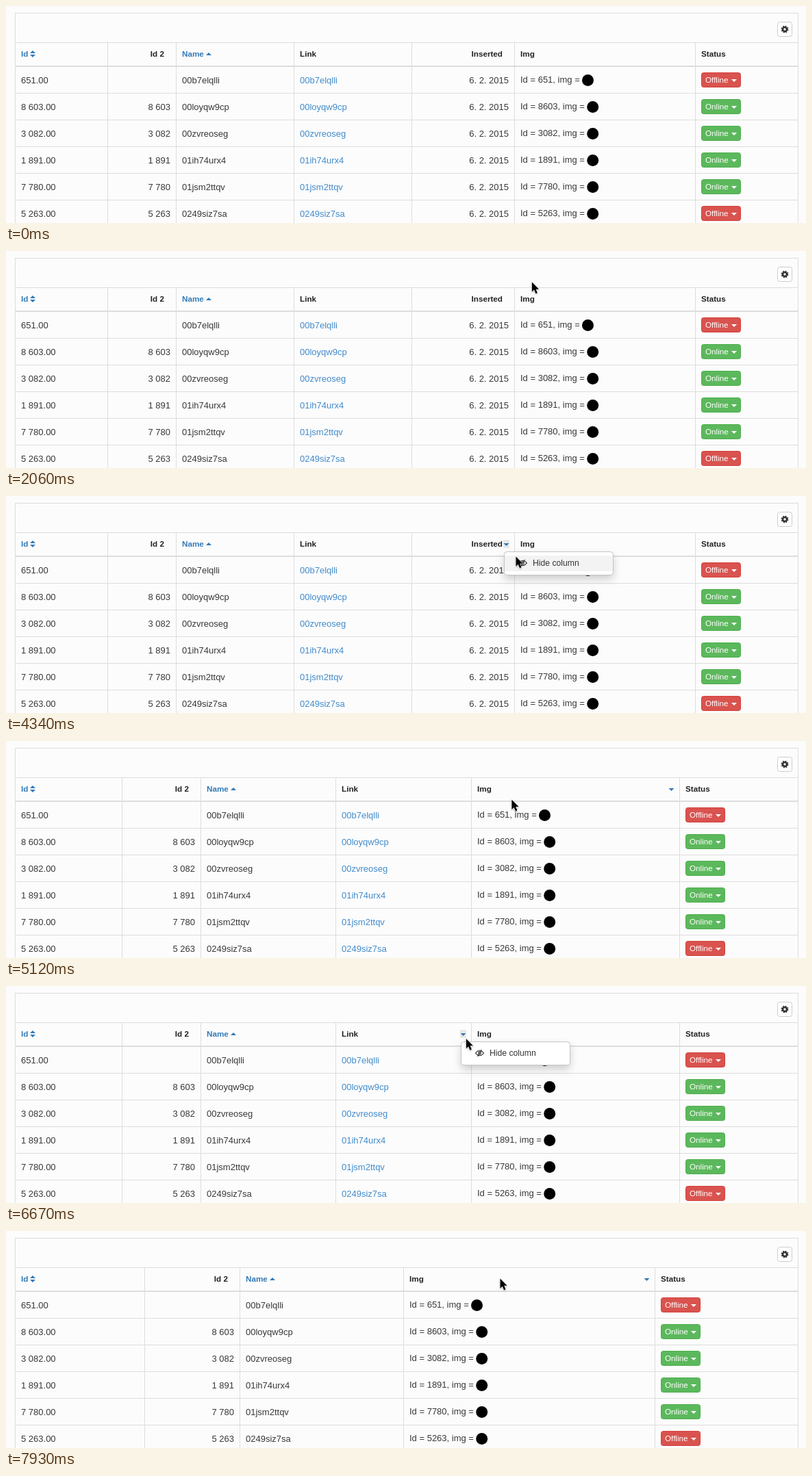
Animation, 1168 px wide and 317 px high, one loop 7990 ms. Source, as an HTML page:

```html
<!DOCTYPE html>
<html lang="en">
<head>
<meta charset="utf-8">
<title>Hiding table columns</title>
<style>
  html, body { margin: 0; width: 100%; height: 100%; overflow: hidden; background: #fcfcfc; }
  svg { display: block; font: 13px "Liberation Sans", Arial, sans-serif; fill: #383838; }
  .head { font-weight: bold; font-size: 11.7px; fill: #222; }
  .blue { fill: #337ab7; }
  .link { fill: #428bca; }
  .button { font-size: 11.7px; fill: #fff; }
  .item { font-size: 12.2px; fill: #333; }
  .end { text-anchor: end; }
  .menu { filter: drop-shadow(0 6px 6px rgba(0, 0, 0, .175)); }
  .arrow { filter: drop-shadow(0 1px 1px rgba(0, 0, 0, .3)); }
</style>
</head>
<body>
<svg id="stage" width="1168" height="317" viewBox="0 0 1168 317"></svg>
<script>
const LOOP = 7990;
const LEFT = 13, RIGHT = 1156;

const rows = [
  [651, '00b7elqlli', false], [8603, '00loyqw9cp', true], [3082, '00zvreoseg', true],
  [1891, '01ih74urx4', true], [7780, '01jsm2ttqv', true], [5263, '0249siz7sa', false],
];

// Columns with their right edges, from the given time on
const layouts = [
  { from: 0, Id: 148, 'Id 2': 248, Name: 420, Link: 592, Inserted: 742, Img: 1006, Status: RIGHT },
  { from: 4400, Id: 169, 'Id 2': 284, Name: 481, Link: 679, Img: 983, Status: RIGHT },
  { from: 7430, Id: 202, 'Id 2': 341, Name: 580, Img: 947, Status: RIGHT },
];

// Pointer moves: start, end, number of steps, quadratic curve
const moves = [
  [1020, 1780, 12, [1190, 60], [1025, 35], [836, 44]],
  [1830, 2460, 12, [836, 44], [733, 38], [732, 69]],
  [3180, 3470, 6, [732, 69], [735, 82], [744.5, 88.5]],
  [5120, 5670, 10, [744.5, 88.5], [715, 74], [667, 70]],
  [6670, 6840, 4, [667, 70], [676, 85], [690.5, 93]],
  [7840, 7930, 2, [690.5, 93], [706, 81], [721.5, 69.5]],
];
const clicks = [[2820, 2880], [3710, 3800], [6380, 6440], [7080, 7140]];
const menus = [[2820, 4400, 'Inserted'], [6380, 7430, 'Link']];

const during = (list, t) => list.find(([start, end]) => t >= start && t < end);
const rect = (x, y, w, h, fill = '#ddd', extra = '') =>
  `<rect x="${x}" y="${y}" width="${w}" height="${h}" fill="${fill}" ${extra}/>`;
const text = (x, y, content, name = '') => `<text x="${x}" y="${y}" class="${name}">${content}</text>`;
const down = (x, y, fill = '#337ab7') => `<path d="M${x - 4} ${y}h8l-4 4z" fill="${fill}"/>`;
const up = (x, y) => `<path d="M${x - 4} ${y}h8l-4-4z" fill="#337ab7"/>`;
const spaced = id => String(id).replace(/(\d)(\d{3})$/, '$1 $2');

function headCell(name, x, right) {
  const sortable = name === 'Id' || name === 'Name';
  const atEnd = name === 'Id 2' || name === 'Inserted';
  const label = text(atEnd ? right - 17 : x, 74, name, `head ${sortable ? 'blue' : ''} ${atEnd ? 'end' : ''}`);
  if (name === 'Id') return label + up(x + 17, 69) + down(x + 17, 71);
  return name === 'Name' ? label + up(x + 39, 72) : label;
}

function statusButton(x, y, online) {
  const [fill, border] = online ? ['#5cb85c', '#4cae4c'] : ['#d9534f', '#d43f3a'];
  return rect(x + .5, y - 10.5, 57, 21, fill, `stroke="${border}" rx="3"`) +
    text(x + 6, y + 4, online ? 'Online' : 'Offline', 'button') + down(x + 48, y - 1, '#fff');
}

function bodyCell(name, x, right, y, [id, word, online]) {
  switch (name) {
    case 'Id': return text(x, y + 5, spaced(id) + '.00');
    case 'Id 2': return id < 1000 ? '' : text(right - 8, y + 5, spaced(id), 'end');
    case 'Name': return text(x, y + 5, word);
    case 'Link': return text(x, y + 5, word, 'link');
    case 'Inserted': return text(right - 8, y + 5, '6. 2. 2015', 'end');
    case 'Img': return text(x, y + 4, `Id = ${id}, img =`) +
      `<circle cx="${x + (id < 1000 ? 98.5 : 105.7)}" cy="${y + .5}" r="8.5" fill="#000"/>`;
    default: return statusButton(x, y, online);
  }
}

function eachColumn({ from, ...columns }, draw) {
  let left = LEFT;
  return Object.entries(columns).map(([name, right]) => {
    const out = draw(name, left, right);
    left = right;
    return out;
  }).join('');
}

function table(layout) {
  const frame = rect(LEFT, 10, RIGHT - LEFT + 1, 1) + rect(LEFT, 10, 1, 307) + rect(RIGHT, 10, 1, 307) +
    rect(LEFT, 53, RIGHT - LEFT, 1) + rect(LEFT, 87, RIGHT - LEFT, 2) +
    rows.map((_, i) => rect(LEFT, 127 + 39 * i, RIGHT - LEFT, 1)).join('');
  const gear = rect(1126.5, 23.5, 21, 21, '#fff', 'stroke="#ccc" rx="3"') +
    `<g fill="none" stroke="#333"><circle cx="1137" cy="34" r="3" stroke-width="2.6"/>
     <circle cx="1137" cy="34" r="4.6" stroke-width="1.6" stroke-dasharray="2 1.61"/></g>`;
  return frame + gear + eachColumn(layout, (name, left, right) =>
    rect(right, 53, 1, 264) + headCell(name, left + 9, right) +
    rows.map((row, i) => bodyCell(name, left + 9, right, 108 + 39 * i, row)).join(''));
}

function menu(x, hovered) {
  return `<g class="menu">${rect(x + .5, 81.5, 159, 34, '#fff', 'stroke="#c4c4c4" rx="4"')}</g>` +
    (hovered ? rect(x + 1, 87, 158, 23, '#f3f3f3') : '') +
    `<g transform="translate(${x + 27.5} 98)" fill="none" stroke="#333" stroke-width="1.2">
      <path d="M-6 0Q0-7.5 6 0Q0 7.5-6 0ZM3-5L-3 5"/><circle r="1.8"/></g>` +
    text(x + 42, 102, 'Hide column', 'item');
}

const arrow = `<path class="arrow" d="M0 0V14.2L3.2 11.2L5.6 16.8L8 15.8L5.7 10.3H10.1Z"
  fill="#000" stroke="#fff" stroke-width="1" paint-order="stroke"/>`;
const hand = `<path d="M-1.6 8.5V1.2C-1.6-.6 1.4-.6 1.4 1.2L1.6 5.2C2.2 4.2 4.2 4.4 4.3 5.8
  C5 5 6.8 5.3 6.9 6.6C7.6 6 9 6.6 9 8L8.6 11.5L7.2 14V16.3H-.8V14.5L-4.5 9.8C-5.4 8.2-3.6 7-1.6 9.4
  M1.5 10v4M3.8 10v4M6 10v4" fill="#fff" stroke="#000" stroke-width="1.1"/>`;

function pointerAt(t) {
  const move = moves.filter(([start]) => t >= start).pop();
  if (!move) return [1300, 60];
  const [start, end, steps, a, b, c] = move;
  const passed = Math.min(1, (t - start) / (end - start));
  const u = (Math.floor(passed * (steps - 1) + 1e-6) + 1) / steps;
  return a.map((v, i) => (1 - u) ** 2 * v + 2 * u * (1 - u) * b[i] + u * u * c[i]);
}

function scene(t) {
  const layout = layouts.filter(({ from }) => t >= from).pop();
  const [x, y] = pointerAt(t);
  const open = during(menus, t);
  let active = open && open[2];
  if (!open && y > 53 && y < 88) {
    eachColumn(layout, (name, left, right) => { if (x > left && x <= right) active = name; });
  }
  // The last column keeps no drop-down arrow
  if (active === 'Status') active = undefined;
  const caretX = layout[active] - 11.5;
  const onCaret = active && Math.abs(x - caretX) < 5 && Math.abs(y - 70) < 6;

  let out = table(layout);
  if (active) out += (open || onCaret ? rect(caretX - 4.5, 64, 9, 12, '#e8e8e8') : '') + down(caretX, 69);
  if (open) out += menu(layout[active] - 15, y > 82);
  if (during(clicks, t)) {
    out += `<circle cx="${x + 1.5}" cy="${y - 1.5}" r="9.7" fill="#fff" fill-opacity=".6" stroke="#000"/>`;
  }
  return out + `<g transform="translate(${x} ${y})">${onCaret ? hand : arrow}</g>`;
}

const stage = document.getElementById('stage');
let shown = '';
function frame() {
  const next = scene(performance.now() % LOOP);
  if (next !== shown) stage.innerHTML = shown = next;
  requestAnimationFrame(frame);
}
frame();
</script>
</body>
</html>
```
